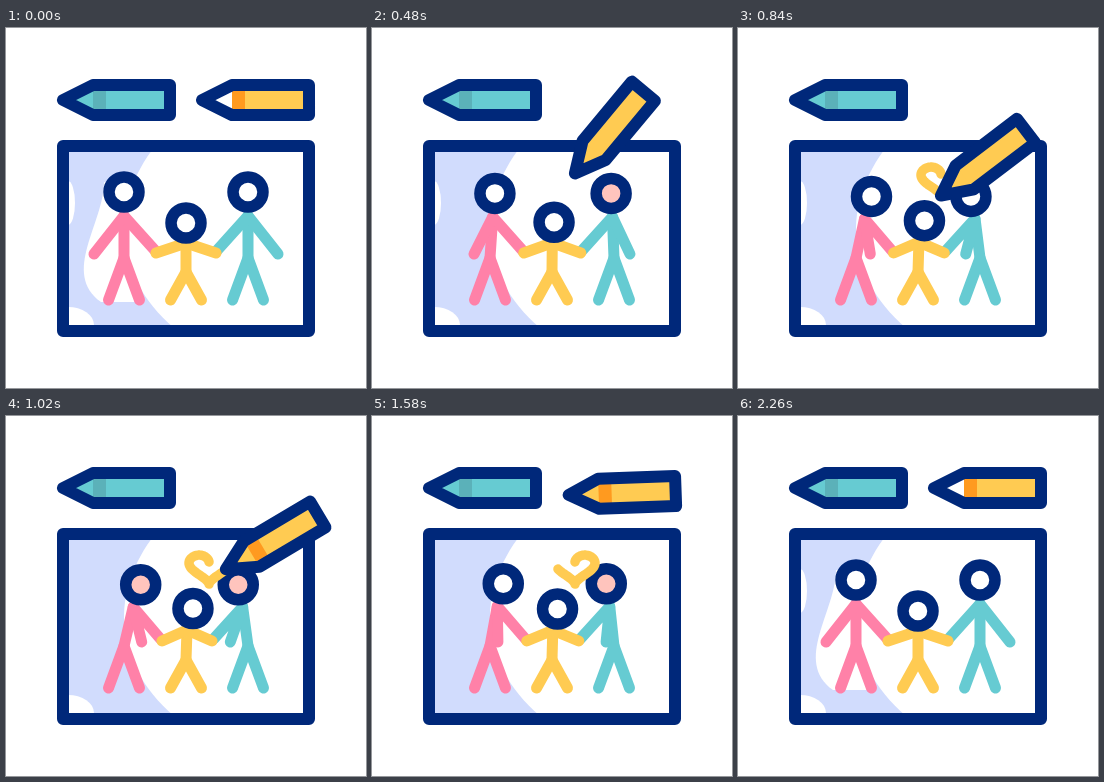
Animation of 360 by 360 pixels, one loop 2400 ms. Source, as an HTML page with a canvas:

```html
<!DOCTYPE html>
<html>
<head>
<meta charset="utf-8">
<style>
html, body { margin: 0; width: 100%; height: 100%; overflow: hidden; background: #fff; }
canvas { display: block; width: 360px; height: 360px; }
</style>
</head>
<body>
<canvas id="stage" width="360" height="360"></canvas>
<script>
const ctx = document.getElementById('stage').getContext('2d');
const LOOP = 2400, SWAY = 1150;
const DRAW_START = 460, DRAW_END = 1265, ERASE_START = 1400, ERASE_END = 2000, PENCIL_HOME = 1720;
const NAVY = '#00287a', PINK = '#ff81a8', YELLOW = '#ffcb52', TEAL = '#66cbd2';
const LILAC = '#d1dcfd', SKIN = '#ffc4bd', ORANGE = '#ff9a1f', DARK_TEAL = '#5bb1b9';
const FOOT_Y = 272;

const mix = (a, b, k) => a + (b - a) * k;
const mixPoint = (a, b, k) => a.map((v, i) => mix(v, b[i], k));
const progress = (t, from, to) => Math.min(1, Math.max(0, (t - from) / (to - from)));
const within = (t, from, to) => t >= from && t < to;
const cubicInOut = k => k < 0.5 ? 4 * k ** 3 : 1 - 4 * (1 - k) ** 3;
const quadOut = k => 1 - (1 - k) ** 2;

function stroke(points, color, width = 11) {
  ctx.beginPath();
  points.forEach(p => ctx.lineTo(...p));
  ctx.strokeStyle = color;
  ctx.lineWidth = width;
  ctx.stroke();
}

function ellipse(x, y, rx, ry, color) {
  ctx.beginPath();
  ctx.ellipse(x, y, rx, ry, 0, 0, Math.PI * 2);
  ctx.fillStyle = color;
  ctx.fill();
}

// Heart curve running from the notch over the left lobe and back to the notch.
function heartAt(k) {
  const u = k * Math.PI * 2;
  const rise = 13 * Math.cos(u) - 5 * Math.cos(2 * u) - 2 * Math.cos(3 * u) - Math.cos(4 * u);
  return [203 - 20 * Math.sin(u) ** 3, 151 - rise];
}

function drawHeart(t) {
  const from = progress(t, ERASE_START, ERASE_END);
  const to = progress(t, DRAW_START, DRAW_END);
  if (to <= from) return;
  const points = Array.from({ length: 61 }, (_, i) => heartAt(mix(from, to, i / 60)));
  stroke(points, YELLOW, 9.5);
}

function drawBackdrop(t) {
  ctx.fillStyle = LILAC;
  ctx.beginPath();
  ctx.moveTo(57, 118);
  ctx.lineTo(149, 118);
  ctx.bezierCurveTo(105, 175, 105, 245, 168, 300);
  ctx.lineTo(57, 300);
  ctx.fill();

  const resting = t < 400 || t >= 2000;
  if (resting) {
    ctx.fillStyle = '#fff';
    ctx.beginPath();
    ctx.moveTo(98, 154);
    ctx.bezierCurveTo(98, 195, 55, 245, 95, 274);
    ctx.lineTo(136, 274);
    ctx.lineTo(118, 158);
    ctx.fill();
  }
  if (resting || t < 900) ellipse(62, 175, 7, 22, '#fff');
  if (!within(t, 1500, 2000)) ellipse(62, 297, 26, 18, '#fff');
}

function drawFigure(color, head, neck, hip, hands, face) {
  stroke([neck, hip], color);
  stroke([[hip[0] - 15.5, FOOT_Y], hip, [hip[0] + 15.5, FOOT_Y]], color);
  stroke([hands[0], neck, hands[1]], color);
  ellipse(...head, 15, 15, face);
  ctx.strokeStyle = NAVY;
  ctx.lineWidth = 11.5;
  ctx.stroke();
}

// side is 1 when the child stands to the right, -1 when to the left.
function drawAdult(color, x, side, shift, lean, face) {
  const offset = shift * lean;
  drawFigure(color,
    [x + offset, 164 + 4.8 * lean],
    [x + 0.55 * offset, 188 + 3 * lean],
    [x, 230],
    [[x + side * (48 * lean - 30), 226], [x + side * 31.5 + 0.3 * offset, 223]],
    face);
}

function drawChild(x, lean, face) {
  drawFigure(YELLOW,
    [x + 7 * lean, 195 - 2.5 * lean],
    [x + lean, 215 - lean],
    [x, 244],
    [[x - 30 + 6 * lean, 225], [x + 30 - 4 * lean, 225]],
    face);
}

function drawPeople(t) {
  const lean = cubicInOut(t < SWAY ? t / SWAY : Math.max(0, 2 - t / SWAY));
  const face = tinted => tinted ? SKIN : '#fff';
  drawAdult(PINK, 118, 1, 16.8, lean, face(within(t, 900, 1500)));
  drawAdult(TEAL, 242, -1, -9.8, lean,
    face(within(t, 440, 560) || within(t, 900, 1950)));
  drawChild(180, lean, face(within(t, 1650, 1950)));
}

function pencilPath() {
  ctx.beginPath();
  ctx.moveTo(0, 0);
  ctx.lineTo(30, -15);
  ctx.lineTo(107, -15);
  ctx.lineTo(107, 15);
  ctx.lineTo(30, 15);
  ctx.closePath();
}

function drawPencil(tip, degrees, color, band, bareTip) {
  const bandStart = 30, bandWidth = 13;
  ctx.save();
  ctx.translate(...tip);
  ctx.rotate(degrees * Math.PI / 180);
  pencilPath();
  ctx.fillStyle = color;
  ctx.fill();
  ctx.save();
  ctx.clip();
  ctx.fillStyle = bareTip ? '#fff' : color;
  ctx.fillRect(0, -15, bandStart, 30);
  ctx.fillStyle = band;
  ctx.fillRect(bandStart, -15, bandWidth, 30);
  ctx.restore();
  pencilPath();
  ctx.strokeStyle = NAVY;
  ctx.lineWidth = 12;
  ctx.stroke();
  ctx.restore();
}

function drawMovingPencil(t) {
  const home = [196, 72], startAngle = -51, endAngle = -22;
  const drawn = progress(t, DRAW_START, DRAW_END);
  const away = t < DRAW_START
    ? t / DRAW_START
    : 1 - quadOut(progress(t, DRAW_END, PENCIL_HOME));
  const tip = mixPoint(home, heartAt(drawn), away);
  const angle = mix(startAngle, endAngle, drawn) * away;
  const resting = away < 0.02;
  drawPencil(tip, angle, YELLOW, resting || t > 850 ? ORANGE : YELLOW, resting);
}

function render(t) {
  ctx.fillStyle = '#fff';
  ctx.fillRect(0, 0, 360, 360);
  ctx.lineCap = ctx.lineJoin = 'round';
  drawBackdrop(t);
  ctx.strokeStyle = NAVY;
  ctx.lineWidth = 12;
  ctx.strokeRect(57, 118, 246, 185);
  drawPeople(t);
  drawHeart(t);
  drawPencil([57, 72], 0, TEAL, DARK_TEAL, false);
  drawMovingPencil(t);
}

const start = performance.now();
function tick() {
  render((performance.now() - start) % LOOP);
  requestAnimationFrame(tick);
}
tick();
</script>
</body>
</html>
```
